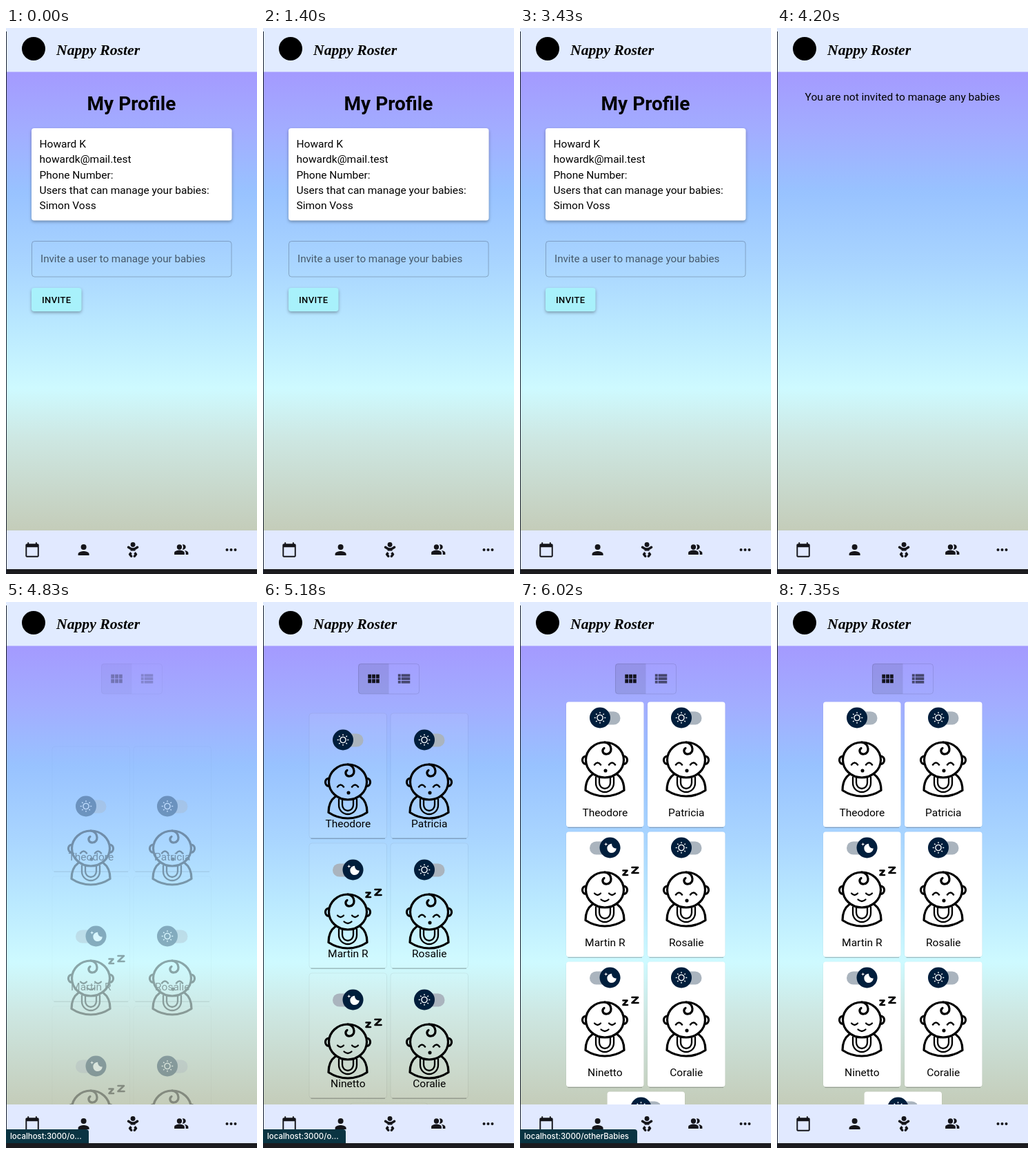
An HTML page that plays this animation: 364 px wide and 790 px high, repeating every 7560 ms.

```html
<!DOCTYPE html>
<html lang="en">
<head>
<meta charset="utf-8">
<title>Nappy Roster</title>
<style>
html, body { margin: 0; width: 100%; height: 100%; overflow: hidden; background: #1b1b1f; }
svg { position: absolute; left: 0; top: 0; }
text { font-family: Roboto, sans-serif; font-size: 15.5px; }
.title { font-size: 28px; font-weight: 700; }
.brand { font: italic 700 21.7px "Liberation Serif", serif; }
.button { font-size: 13px; font-weight: 500; letter-spacing: .4px; }
.mid { text-anchor: middle; }
.line { fill: none; stroke: #000; stroke-width: 3.2; stroke-linecap: round; stroke-linejoin: round; }
.thin { stroke-width: 2.3; }
.raised { filter: drop-shadow(0 2px 2px rgba(0,0,0,.32)); }
#bubble {
  position: absolute; left: 0; top: 763px; height: 20px; overflow: hidden;
  background: #0a3442; color: #fff; border-radius: 0 4px 0 0;
  font: 500 11.4px/20px Inter, sans-serif; text-indent: 6px; white-space: nowrap;
}
</style>
</head>
<body>
<svg id="stage" width="364" height="790" viewBox="0 0 364 790">
  <defs>
    <linearGradient id="sky" x1="0" y1="0" x2="0" y2="1">
      <stop offset="0" stop-color="#a49aff"/>
      <stop offset=".13" stop-color="#a2adff"/>
      <stop offset=".26" stop-color="#98c2ff"/>
      <stop offset=".42" stop-color="#a9d5ff"/>
      <stop offset=".55" stop-color="#b9e8ff"/>
      <stop offset=".69" stop-color="#cefaff"/>
      <stop offset=".8" stop-color="#cde7e2"/>
      <stop offset="1" stop-color="#c4ccb9"/>
    </linearGradient>
  </defs>
  <rect y="63" width="364" height="665" fill="url(#sky)"/>

  <g id="profile">
    <text class="title mid" x="182" y="119">My Profile</text>
    <rect class="raised" x="37" y="145" width="290.5" height="133.5" rx="4" fill="#fff"/>
    <g id="details"></g>
    <path id="outline" fill="none"/>
    <text id="label" style="font-size:15.2px">Invite a user to manage your babies</text>
    <rect id="caret" x="50" y="325" width="1.2" height="18" fill="#223"/>
    <rect class="raised" x="37" y="376" width="72.5" height="34" rx="4" fill="#a8f1fb"/>
    <text class="button" x="52" y="397.5">INVITE</text>
  </g>

  <text id="empty" class="mid" x="182" y="105">You are not invited to manage any babies</text>

  <g id="grid">
    <path d="M142 89h40.5v44H142a4 4 0 0 1-4-4V93a4 4 0 0 1 4-4z" fill="#000" fill-opacity=".09"/>
    <rect x="138.5" y="89.5" width="88" height="43.5" rx="4" fill="none" stroke="#000" stroke-opacity=".1"/>
    <path transform="translate(148.4 99.8) scale(.97)" fill="#14141f"
      d="M4 5h5v6H4zM10 5h5v6h-5zM16 5h5v6h-5zM4 12h5v6H4zM10 12h5v6h-5zM16 12h5v6h-5z"/>
    <path transform="translate(192.9 99.4) scale(.97)" fill="#000" fill-opacity=".56"
      d="M3 5h4v4H3zM8 5h13v4H8zM3 10h4v4H3zM8 10h13v4H8zM3 15h4v4H3zM8 15h13v4H8z"/>
    <g id="cards"></g>
  </g>

  <rect width="364" height="63.5" fill="#e1ebff"/>
  <circle cx="40" cy="30" r="17"/>
  <text class="brand" x="73" y="38.5">Nappy Roster</text>

  <rect y="727" width="364" height="56" fill="#e1e9ff"/>
  <g fill="#15151a">
    <path transform="translate(26.4 743.4) scale(.97)"
      d="M20 3h-1V1h-2v2H7V1H5v2H4c-1.1 0-2 .9-2 2v16c0 1.1.9 2 2 2h16c1.1 0 2-.9 2-2V5c0-1.1-.9-2-2-2zm0 18H4V8h16z"/>
    <path transform="translate(100.6 743)"
      d="M12 12a4 4 0 1 0 0-8 4 4 0 0 0 0 8zm0 2c-2.67 0-8 1.34-8 4v2h16v-2c0-2.66-5.33-4-8-4z"/>
    <g transform="translate(175.8 744) scale(.043)">
      <circle cx="192" cy="80" r="80"/>
      <path d="M112 288v-31c-19-7-37-16-54-28L17 201a40 40 0 0 1 46-66l41 29c53 37 124 37 176 0l41-29a40 40 0 0 1 46 66l-41 28c-17 12-35 21-54 28v31z"/>
      <path id="leg" d="M139 409l25-32-61-51-46 57c-11 14-12 34-1 49l48 64a40 40 0 0 0 64-48z"/>
      <use href="#leg" transform="translate(384 0) scale(-1 1)"/>
    </g>
    <path transform="translate(243.2 743.6) scale(.92)"
      d="M9 12a4 4 0 1 0 0-8 4 4 0 0 0 0 8zm0 1c-2.67 0-8 1.34-8 4v3h16v-3c0-2.66-5.33-4-8-4zm6-1a4 4 0 1 0-1.33-7.76C14.5 5.27 15 6.58 15 8s-.5 2.73-1.33 3.76c.42.14.86.24 1.33.24zm1.67 1.13C18.04 14.06 19 15.32 19 17v3h4v-3c0-2.18-3.57-3.47-6.33-3.87z"/>
    <circle cx="320.5" cy="755" r="2"/><circle cx="326.5" cy="755" r="2"/><circle cx="332.5" cy="755" r="2"/>
  </g>
  <rect y="783" width="364" height="7" fill="#1b1b1f"/>
  <rect y="5" width="1" height="785" fill="#1b2230"/>
</svg>
<div id="bubble"></div>

<script>
const LOOP = 7560, STEP = 70;
const FOCUS = 1400, BLUR = 2590, OPEN = 4130, LOADED = 4830, SETTLED = 5530;
const $ = id => document.getElementById(id);
const clamp = x => Math.max(0, Math.min(1, x));
const ramp = (t, from, to) => clamp((t - from) / (to - from));
const easeOut = p => 1 - (1 - p) ** 3;
const show = (id, on) => { $(id).style.display = on ? '' : 'none'; };

$('details').innerHTML = ['Howard K', 'howardk@mail.test', 'Phone Number:',
  'Users that can manage your babies:', 'Simon Voss']
  .map((s, i) => `<text x="48.5" y="${173 + i * 22.3}">${s}</text>`).join('');

function toggle(asleep) {
  let icon;
  if (asleep) {
    icon = `<path transform="translate(-10 -10)" d="M4.2 2.5l-.7 1.8-1.8.7 1.8.7.7 1.8.6-1.8L6.7 5l-1.9-.7z
      M19.2 10.8a6.7 6.7 0 1 1-6.6-6.6 5.8 5.8 0 0 0 6.6 6.6z"/>`;
  } else {
    let rays = '';
    for (let a = 0; a < 360; a += 45) rays += `<path d="M0-6.2v-2.1" transform="rotate(${a})"/>`;
    icon = `<g fill="none" stroke="#fff" stroke-width="1.4"><circle r="4.1"/>${rays}</g>`;
  }
  return `<rect x="34" y="14" width="44.5" height="19" rx="9.5" fill="#aab4be"/>
    <g transform="translate(${asleep ? 63.5 : 49} 23)" fill="#fff"><circle r="15" fill="#001e3c"/>${icon}</g>`;
}

function baby(asleep) {
  const face = asleep
    ? `<path class="thin" d="M-15 89q4.500 5 9 0M6 89q4.500 5 9 0M-5.500 98q5.500 5 11 0"/>
       <path d="M26.500 56h6l-6 6.500h6.500M39.500 51.500h8.500l-8.500 8h9" stroke-width="2.600"/>`
    : `<path d="M-15 91q4.500-6 9 0M6 91q4.500-6 9 0" stroke-width="2.600"/>
       <circle class="thin" cx="1" cy="99.500" r="1.400"/>`;
  return `<g class="line" transform="translate(56 0)">
    <ellipse cy="84" rx="27.500" ry="25.500"/>
    <path d="M-27.500 78.500a5.800 5.800 0 0 0 0 11.500M27.500 78.500a5.800 5.800 0 0 1 0 11.500"/>
    <path d="M0 58.500C12 61 11 75 3 75.500C-3 76-5 70-1 67"/>
    <path d="M-18 105C-25 110-28 118-28 128Q-15 136.500 0 136.500T28 128C28 118 25 110 18 105"/>
    <path class="thin" d="M-13 109v8.500a13 13 0 0 0 26 0V109M-8 110v7a8 8.500 0 0 0 16 0v-7"/>
    ${face}</g>`.replace(/(\.\d)00/g, '$1');
}

const babies = [['Theodore'], ['Patricia'], ['Martin R', 1], ['Rosalie'], ['Ninetto', 1], ['Coralie'], ['']];
$('cards').innerHTML = babies.map(([name, asleep], i) => {
  const x = i === 6 ? 126.5 : 67 + i % 2 * 118;
  return `<g transform="translate(${x} ${144.5 + (i >> 1) * 188})">
    <rect y=".5" width="112.5" height="181" rx="4" fill="none" stroke="#000" stroke-opacity=".06"/>
    <path d="M2.5 181.700H110" stroke="#000" stroke-opacity=".22" stroke-width="1.5"/>
    <rect class="face" width="112.5" height="181" rx="4" fill="#fff"/>
    <g class="inner">${toggle(asleep)}${baby(asleep)}</g>
    <text class="mid" x="56.3" y="165">${name}</text></g>`;
}).join('');
const faces = document.querySelectorAll('.face');
const inners = document.querySelectorAll('.inner');

function drawField(t) {
  const focused = t > FOCUS && t < BLUR;
  const lift = easeOut(ramp(t, FOCUS, FOCUS + 220)) - easeOut(ramp(t, BLUR - 40, BLUR + 180));
  const notch = 189 * lift;
  const outline = $('outline'), label = $('label');
  outline.setAttribute('d', `M${47 + notch} 308.5H323a4 4 0 0 1 4 4V356a4 4 0 0 1-4 4H41.5a4 4 0 0 1-4-4V312.5a4 4 0 0 1 4-4H47`);
  outline.setAttribute('stroke', focused ? '#df4a9b' : 'rgba(0,0,0,.23)');
  outline.setAttribute('stroke-width', focused ? 2 : 1);
  label.setAttribute('transform', `translate(50 ${339 - 27 * lift}) scale(${1 - .25 * lift})`);
  label.setAttribute('fill', focused ? '#d8479a' : 'rgba(0,0,0,.58)');
  show('caret', focused && (t < 1960 || t >= 2380));
}

function drawGrid(t) {
  const p = ramp(t, LOADED, SETTLED);
  const drop = 64 * (1 - p) ** 2;
  $('grid').setAttribute('opacity', ramp(t, LOADED - STEP, LOADED + 2 * STEP));
  $('cards').setAttribute('transform', `translate(0 ${drop})`);
  inners.forEach(el => el.setAttribute('transform', `translate(0 ${drop})`));
  faces.forEach(el => el.setAttribute('fill-opacity', p ** 4));
}

function drawBubble(t) {
  const bubble = $('bubble');
  bubble.style.opacity = ramp(t, 4340, 4480) - ramp(t, 6580, 6860);
  bubble.style.width = 120 + 50 * ramp(t, 5880, 6020) + 'px';
  bubble.textContent = t < 5950 ? 'localhost:3000/o...' : 'localhost:3000/otherBabies';
}

function frame(now) {
  const t = Math.floor(now % LOOP / STEP) * STEP;
  show('profile', t < OPEN);
  show('empty', t >= OPEN && t < LOADED);
  show('grid', t >= LOADED);
  drawField(t);
  drawGrid(t);
  drawBubble(t);
  requestAnimationFrame(frame);
}
frame(0);
</script>
</body>
</html>
```
